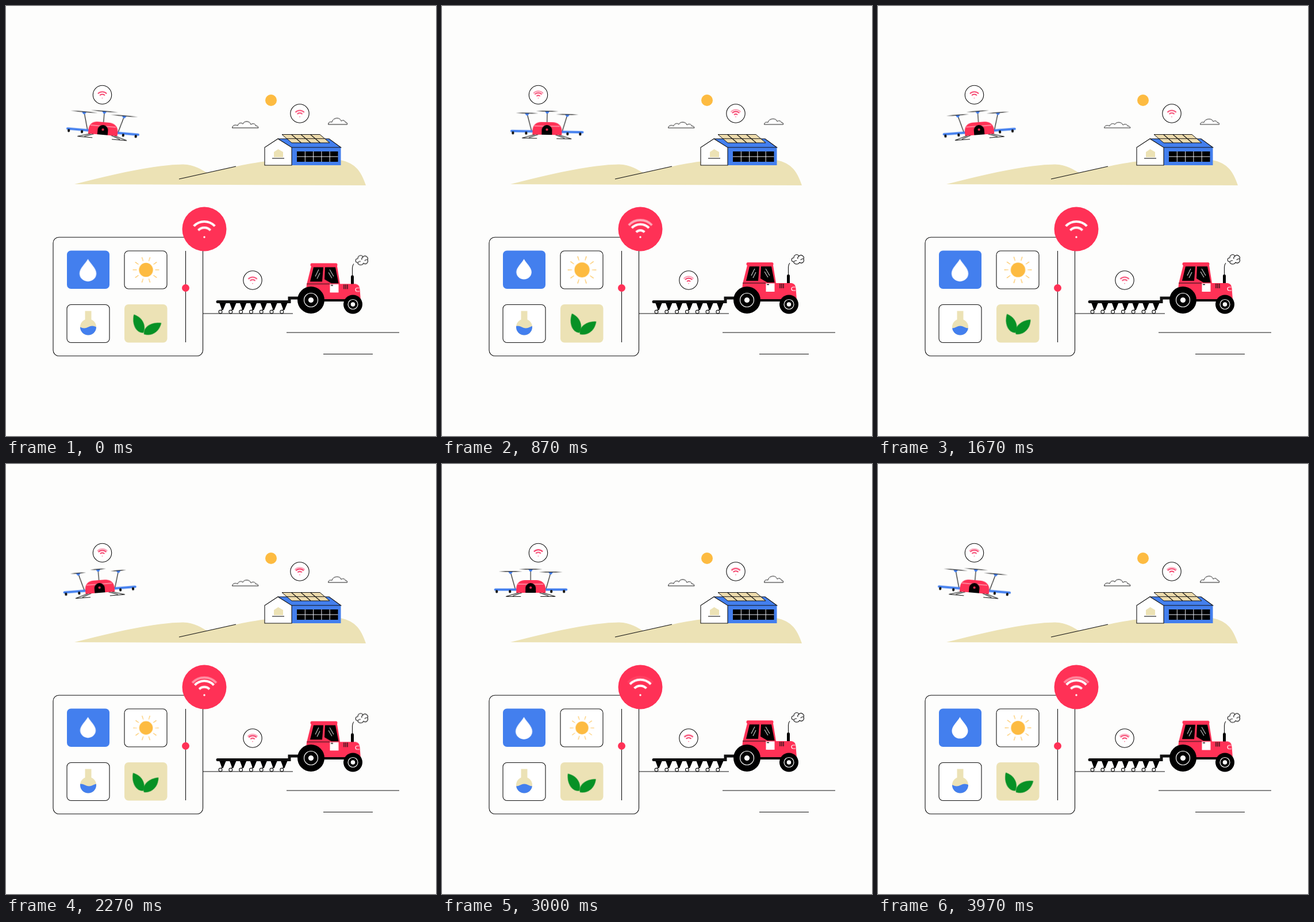
An HTML page for the animation above (4010 ms loop, 748 by 748 pixels).

```html
<!DOCTYPE html>
<html lang="en">
<head>
<meta charset="utf-8">
<title>Smart farm</title>
<style>
  html, body { margin: 0; width: 100%; height: 100%; overflow: hidden; background: #fdfdfc; }
  svg { display: block; width: 100vw; height: 100vh; }
  :root { --half: 2005ms; --pulse: 334.17ms; --sine: cubic-bezier(.37, 0, .63, 1); }
  .line { fill: none; stroke: #111; stroke-width: 1.1; }
  .outlined { fill: #fff; stroke: #111; stroke-width: 1.1; }
  .red { fill: #ff3156; }
  .blue { fill: #437fee; }
  .tan { fill: #ece2b5; }
  .gold { fill: #fdbb41; }
  .green { fill: #079125; }
  .white { fill: #fff; }

  /* slow swings, one full swing per loop */
  .drift, .tilt, .sun, .leaf-l, .leaf-r, .cloud { animation: var(--half) var(--sine) infinite alternate; }
  .drift { animation-name: drift; animation-delay: -1002.5ms; }
  .tilt { animation-name: tilt; }
  .sun { animation-name: sun; animation-delay: -1002.5ms; }
  .leaf-l { animation-name: leaf-l; animation-delay: -1002.5ms; }
  .leaf-r { animation-name: leaf-r; }
  .cloud { animation-name: cloud; animation-delay: -505ms; stroke-width: 1; }
  @keyframes drift { from { transform: translate(154.2px, 215px); } to { transform: translate(182.8px, 215px); } }
  @keyframes tilt { from { transform: rotate(5deg); } to { transform: rotate(-5deg); } }
  @keyframes sun { from { transform: scale(.92); } to { transform: scale(1.08); } }
  @keyframes leaf-l { from { transform: rotate(-34deg); } to { transform: rotate(-21deg); } }
  @keyframes leaf-r { from { transform: rotate(57deg); } to { transform: rotate(44deg); } }
  @keyframes cloud { from { transform: scaleY(1); } to { transform: scaleY(.84); } }

  /* quick cycles */
  .blade { animation: blade 133.67ms var(--sine) -259ms infinite alternate; }
  .bob { animation: bob 66.83ms var(--sine) infinite alternate; }
  .drop { animation: drop calc(var(--pulse) / 2) var(--sine) -284ms infinite alternate; }
  .wave { animation: wave 1336.67ms linear infinite; }
  @keyframes blade { from { transform: scaleX(34.3); } to { transform: scaleX(19.5); } }
  @keyframes bob { from { transform: translateY(.4px); } to { transform: translateY(-1px); } }
  @keyframes drop { from { transform: scale(1.03); } to { transform: scale(.91); } }
  @keyframes wave { to { transform: translateX(-28px); } }

  /* signal arcs rest briefly, then travel outwards */
  .arc { fill: none; stroke: currentColor; vector-effect: non-scaling-stroke; animation: var(--pulse) linear infinite; }
  .outer { animation-name: outer; }
  .middle { animation-name: middle; }
  .inner { animation-name: inner; }
  @keyframes outer {
    0%, 10% { transform: scale(2.5); opacity: 1; }
    60% { opacity: .6; }
    90% { opacity: .4; }
    100% { transform: scale(2.95); opacity: 0; }
  }
  @keyframes middle { 0%, 10% { transform: scale(1.45); } 100% { transform: scale(2.5); } }
  @keyframes inner { 0%, 10% { transform: scale(.4); opacity: 0; } 60%, 100% { opacity: 1; } 100% { transform: scale(1.45); } }
</style>
</head>
<body>
<svg viewBox="0 0 748 748">
  <defs>
    <g id="tooth">
      <path d="M-2 516H10L4.500 529H2.500L1 524Z"/>
      <path class="line" d="M3 527L1 530"/>
      <circle class="outlined" cy="532" r="2.900"/>
    </g>
    <path id="leaf" class="green" d="M0 0C-11-5-12-22 0-36C10-26 12-10 0 0Z"/>
    <clipPath id="bulb"><circle cx="143" cy="558.500" r="14"/></clipPath>
  </defs>

  <!-- hills, sky and barn -->
  <path class="tan" d="M119 310C190 292 260 276 308 275.500C328 276 340 285 350 290C380 284 420 273 470 268L575 267C606 271 617 285 626 312Z"/>
  <path class="line" d="M301 301L400 279"/>
  <circle class="gold" cx="461" cy="164" r="10"/>
  <g transform="translate(416 212)">
    <path class="cloud outlined" d="M-22.500 0C-22-5-17-6-13-4C-12-9-6-10-4-7C-2-13 8-13 10-6C14-9 18-7 18-4C21-4 23-2 23 0Z"/>
  </g>
  <g transform="translate(577 206)">
    <path class="cloud outlined" d="M-16.500 0C-16-5-12-5-10-4C-9-12 4-14 6-6C10-9 13-6 13-4C16-4 17-2 16.500 0Z"/>
  </g>

  <path class="blue" d="M473 231H562L582.500 246V277H497V246Z"/>
  <path class="line" d="M473 231H562L582.500 246H497"/>
  <path class="outlined" d="M450 277V246L473 231L497 246V277Z"/>
  <path d="M480 223.500H546L563 238H497Z" fill="#eedcad" stroke="#111"/>
  <path class="line" d="M488.500 230.700H554.500M496.500 223.500L513.500 238M513 223.500L530 238M529.500 223.500L546.500 238"/>
  <path d="M506 253H577.500V271H506Z"/>
  <path d="M506 262H577.500M520.300 253V271M534.600 253V271M548.900 253V271M563.200 253V271" fill="none" stroke="#e8ecf5"/>
  <path class="tan" d="M466 263V254L473.500 249L482 254V263Z"/>
  <path class="line" d="M463 265H484"/>

  <!-- drone -->
  <g class="drift"><g class="tilt" id="drone">
    <path class="line" d="M-35-27L-26 5M0-32V-12M35-26L26 5M-13 8L-31 14.500M-18 8L-43 15.500H-17M13 8L31 14.500M18 8L43 15.500H17"/>
    <path d="M-61.500 3.500H-24M24 3.500H62" stroke="#437fee" stroke-width="4" stroke-linecap="round"/>
    <path d="M-59 6V7.500M-36 6V7.500M36 6V7.500M58 6V7.500" stroke="#111" stroke-width="4" stroke-linecap="round"/>
    <path class="red" d="M-25 9V2C-25-8-18-13-10-13H10C18-13 26-8 26 2V9Z"/>
    <path d="M-22-6H22" stroke="#ffd0d8"/>
    <path d="M-9 9V1A9 9 0 0 1 9 1V9Z"/>
    <circle class="red" r="2"/>
  </g></g>

  <!-- control panel -->
  <rect class="line" x="82" y="402.300" width="260.500" height="206.500" rx="10"/>
  <path class="line" d="M312.500 426V585"/>
  <circle class="red" cx="312.500" cy="490.500" r="6.500"/>
  <rect class="blue" x="106" y="425.500" width="74" height="66.500" rx="7"/>
  <rect class="outlined" x="206" y="426" width="74" height="66" rx="7"/>
  <rect class="outlined" x="106" y="519.500" width="74" height="66" rx="7"/>
  <rect class="tan" x="206" y="519" width="74.500" height="66.500" rx="7"/>

  <g transform="translate(142.500 440)">
    <path class="drop white" d="M0 0C4 8 14.500 16 14.500 25A14.500 14 0 0 1-14.500 25C-14.500 16-4 8 0 0Z"/>
  </g>
  <g transform="translate(243.500 459)"><g class="sun">
    <circle class="gold" r="12.200"/>
    <circle r="19.500" fill="none" stroke="#fdbb41" stroke-width="7" pathLength="10" stroke-dasharray=".08 .92" stroke-dashoffset=".04"/>
  </g></g>

  <path class="tan" d="M137.500 530.500H148.500V548H137.500Z"/>
  <circle class="tan" cx="143" cy="558.500" r="14"/>
  <g clip-path="url(#bulb)">
    <path class="wave blue" d="M115 558.500q7-4 14 0t14 0t14 0t14 0t14 0t14 0V575H115Z"/>
  </g>

  <g transform="translate(239 568.500)"><use class="leaf-l" href="#leaf"/></g>
  <g transform="translate(240 571)"><use class="leaf-r" href="#leaf"/></g>

  <circle class="red" cx="345" cy="388" r="38.500"/>
  <circle class="outlined" cx="167.500" cy="154.500" r="16.200"/>
  <circle class="outlined" cx="511" cy="187" r="16.200"/>
  <circle class="outlined" cx="429" cy="477" r="16.200"/>
  <g id="signals"></g>

  <!-- field lines and harrow -->
  <path class="line" d="M343 535H499M488 568H684M552 605.500H638"/>
  <path d="M368 514.500H493V508H512" fill="none" stroke="#111" stroke-width="5" stroke-linecap="round"/>
  <use href="#tooth" x="373"/>
  <use href="#tooth" x="390.800"/>
  <use href="#tooth" x="408.600"/>
  <use href="#tooth" x="426.400"/>
  <use href="#tooth" x="444.200"/>
  <use href="#tooth" x="462"/>
  <use href="#tooth" x="479.800"/>

  <!-- tractor -->
  <g class="bob">
    <path class="line" d="M602.500 469V455Q602.500 451 605 448"/>
    <path class="outlined" d="M612 446C607 446 607 439 612 439C612 433 619 432 621 436C625 432 631 437 629 441C631 446 626 450 622 447C619 452 612 450 612 446Q614 443 617 444M621 436Q618 438 619 441M629 441Q625 440 624 443"/>
    <path d="M600 484V470Q600 468 602.500 468T605 470V484Z"/>
    <path class="red" d="M521 509L523 484L531 452H576L581 483H608Q615 484 615.500 492L617 512H555Z"/>
    <rect class="red" x="529.500" y="447" width="47" height="5.500" rx="2.500"/>
    <path d="M535 454H552L550 479H529ZM555 454H573L578.500 482H566L554 475Z"/>
    <path d="M538 470L544 458M541 474L546 464M563 458L570 470M561 463L567 473" stroke="#fff"/>
    <path class="white" d="M563.500 483.500H578.500V498H563.500Z"/>
    <path d="M565 485.500H569M588 484V492M591 484V492M594 484V492" stroke="#111" stroke-width="1.300"/>
    <path d="M614.500 490H611Q608 490 608 493T611 496H615" fill="none" stroke="#fff" stroke-width="1.200"/>
    <path class="line" d="M523 483H563"/>
  </g>
  <path d="M550 510H592V514H550Z"/>
  <g stroke="#fff" stroke-width="1.200">
    <circle cx="530.500" cy="511.500" r="23.500" stroke="none"/>
    <circle cx="530.500" cy="511.500" r="12"/>
    <circle class="white" cx="530.500" cy="511.500" r="4"/>
    <circle cx="603.500" cy="519" r="16.500" stroke="none"/>
    <circle cx="603.500" cy="519" r="8.500"/>
    <circle class="white" cx="603.500" cy="519" r="3.200"/>
  </g>
</svg>
<script>
  const arc = name => `<path class="arc ${name}" d="M-7.31-6.82A10 10 0 0 1 7.31-6.82"/>`;

  const signal = (x, y, scale, color, width) => `
    <g transform="translate(${x} ${y}) scale(${scale})" color="${color}" stroke-width="${width}">
      ${['outer', 'middle', 'inner'].map(arc).join('')}
      <circle cy="2" r="1.7" fill="currentColor" stroke="none"/>
    </g>`;

  const rotor = (x, y) => `
    <g transform="translate(${x} ${y})">
      <path class="blue" d="M-4 0H4L1.5 4H-1.5Z"/>
      <path class="blade" d="M-.5 0H.5" stroke="#111" stroke-width="1.2"/>
    </g>`;

  const badge = (x, y) => signal(x, y + 5, .415, '#f53361', 1.9);
  const add = (id, markup) => document.getElementById(id).insertAdjacentHTML('beforeend', markup);

  add('signals', signal(345, 400, 1, '#fff', 4) + badge(167.5, 154.5) + badge(511, 187) + badge(429, 477));
  add('drone', rotor(-35, -28) + rotor(0, -32) + rotor(35, -27));
</script>
</body>
</html>
```
